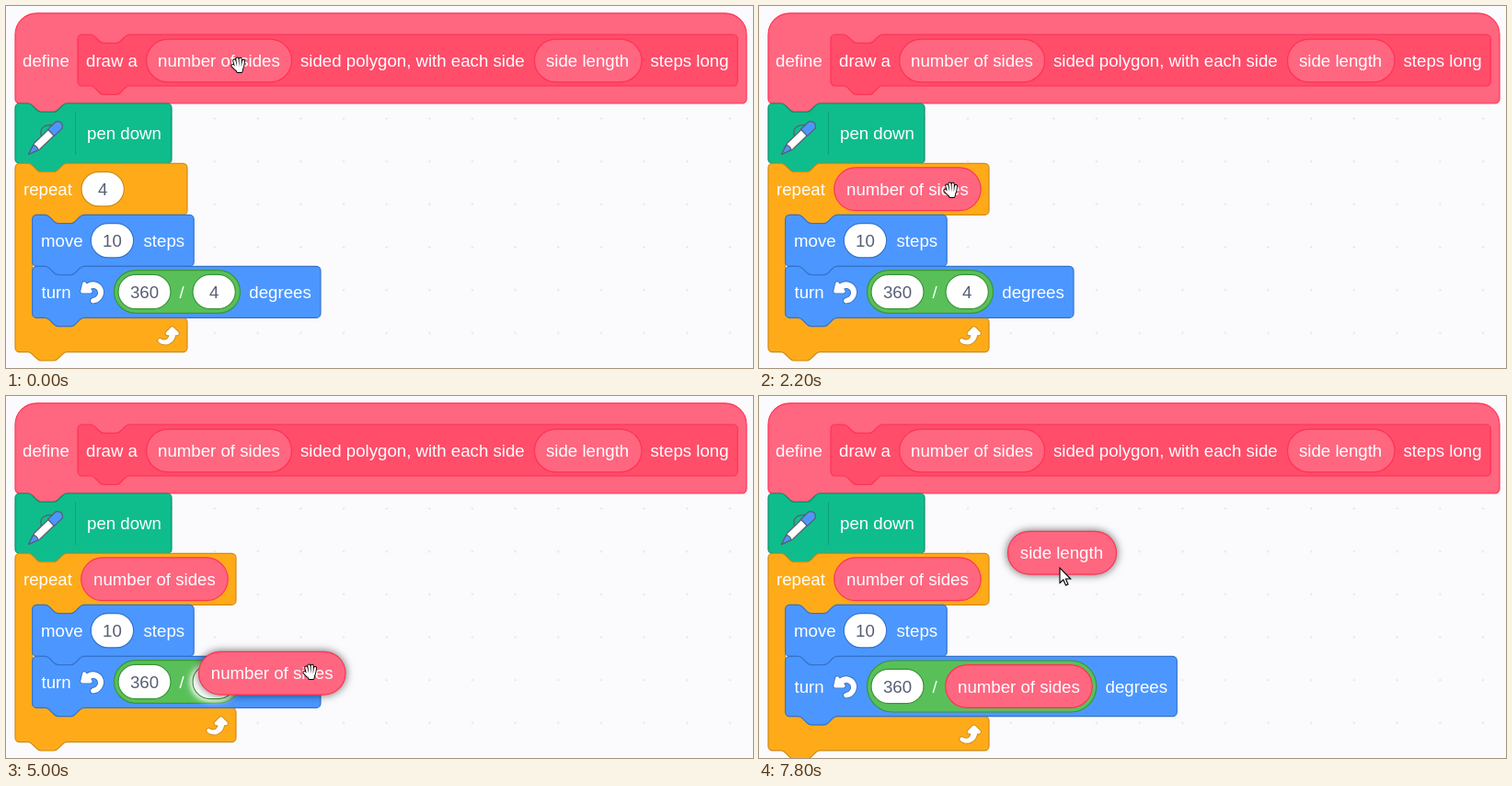
An HTML page that plays this animation: 812 by 394 pixels, repeating every 8000 ms.

```html
<!DOCTYPE html>
<html lang="en">
<head>
<meta charset="utf-8">
<title>Custom block with parameters</title>
<style>
html, body { margin: 0; width: 100%; height: 100%; overflow: hidden; background: #fbfafc; }
svg { display: block; width: 812px; height: 394px; }
text { font: 18.67px "Liberation Sans", Arial, sans-serif; fill: #fff; }
.value { fill: #575e75; text-anchor: middle; }
.drag { filter: drop-shadow(0 0 5px rgba(0, 0, 0, .6)); }
.glow { filter: drop-shadow(0 0 3px #fff) drop-shadow(0 0 3px #fff); }
</style>
</head>
<body>
<svg id="stage" viewBox="0 0 812 394"></svg>
<script>
const LOOP = 8000, STEP = 200, UNIT = 7 / 6;
const COLORS = {
  custom: ['#ff6680', '#ff3355'], proto: ['#ff4d6a', '#ff3355'], pen: ['#0fbd8c', '#0b8e69'],
  control: ['#ffab19', '#cf8b17'], motion: ['#4c97ff', '#3373cc'], operator: ['#59c059', '#389438']
};

// Block outlines, in block units
const NOTCH = 'c2 0 3 1 4 2l4 4c1 1 2 2 4 2h12c2 0 3-1 4-2l4-4c1-1 2-2 4-2';
const TAB = 'c-2 0-3 1-4 2l-4 4c-1 1-2 2-4 2h-12c-2 0-3-1-4-2l-4-4c-1-1-2-2-4-2';
const TOP = 'M0 4A4 4 0 0 1 4 0H12' + NOTCH;
const BOTTOM = `a4 4 0 0 1-4 4H48${TAB}H4a4 4 0 0 1-4-4z`;
const stack = (w, h) => `${TOP}H${w - 4}a4 4 0 0 1 4 4V${h - 4}${BOTTOM}`;
const hat = (w, h) => `M0 20A20 20 0 0 1 20 0H${w - 20}a20 20 0 0 1 20 20V${h - 4}${BOTTOM}`;
const mouth = (w, h) => `${TOP}H${w - 4}a4 4 0 0 1 4 4V44a4 4 0 0 1-4 4H64${TAB}h-8a4 4 0 0 0-4 4v${h - 8}` +
  `a4 4 0 0 0 4 4h8${NOTCH}H${w - 4}a4 4 0 0 1 4 4v24${BOTTOM}`;

const LOOP_ICON = 'M23.3 11c-.3.6-.9 1-1.5 1h-1.6c-.1 1.3-.5 2.5-1.1 3.6-.9 1.7-2.3 3.2-4.1 4.1-1.7.9-3.6 1.2-5.5.9-1.8-.3-3.5-1.1-4.9-2.3-.7-.7-.7-1.9 0-2.6.6-.6 1.6-.7 2.3-.2 1 .6 2 .9 3 .9s1.9-.3 2.7-.9c1.1-.8 1.8-2.1 1.8-3.5h-1.5c-.9 0-1.7-.7-1.7-1.7 0-.4.2-.9.5-1.2l4.4-4.4c.7-.6 1.7-.6 2.4 0L23 9.2c.5.5.6 1.2.3 1.8z';
const TURN_ICON = 'M22.7 12.2a1.6 1.6 0 0 1-1.3.6h-7.7a1.6 1.6 0 0 1-1.1-2.6l1.1-1.4a4.8 4.8 0 0 0-3.2-.7 4.3 4.3 0 0 0-3.3 2.5 5 5 0 0 0 .5 4.6 5.6 5.6 0 0 0 4.3 2.5 2.3 2.3 0 0 1-.2 4.5A10.2 10.2 0 0 1 3.7 18a10.1 10.1 0 0 1-1.5-9.2 9.8 9.8 0 0 1 7.5-6.3 10.7 10.7 0 0 1 7.7 1.7l1.1-1.4a1.6 1.6 0 0 1 2.7.6l1.7 7.4a1.6 1.6 0 0 1-.2 1.4z';

const paint = kind => `fill="${COLORS[kind][0]}" stroke="${COLORS[kind][1]}"`;
const block = (shape, kind, x, y, w, h) =>
  `<path transform="translate(${x} ${y}) scale(${UNIT})" d="${shape(w / UNIT, h / UNIT)}" ${paint(kind)}/>`;
// Labels and pills are placed by their vertical centre
const label = (s, x, cy) => `<text x="${x}" y="${cy + 6.5}">${s}</text>`;
const pill = (kind, x, cy, w, h = 46.7) =>
  `<rect x="${x}" y="${cy - h / 2}" width="${w}" height="${h}" rx="${h / 2}" ${paint(kind)} stroke-width="1.17"/>`;
const input = (kind, s, x, cy, w = 46.3) =>
  pill(kind, x, cy, w, 37.3).replace(COLORS[kind][0], '#fff') +
  `<text class="value" x="${x + w / 2}" y="${cy + 6.5}">${s}</text>`;
const param = (s, x, cy) => pill('custom', x, cy, s === 'side length' ? 118 : 159.5) + label(s, x + 13.3, cy);
const icon = (d, kind, x, y, flip = 1) =>
  `<path transform="translate(${x} ${y}) scale(${UNIT * flip} ${UNIT})" d="${d}" fill="#fff" stroke="${COLORS[kind][1]}" stroke-width="1.6" paint-order="stroke"/>`;

const penIcon = `<g transform="translate(24.5 161.5) rotate(-44)" stroke="#575e75" stroke-width="1.2" stroke-linejoin="round">
  <path d="M24-5C28-12 34-12 41-5" fill="none"/>
  <path d="M0 0L13-4.5H46Q52 0 46 4.5H13Z" fill="#fff"/>
  <path d="M34-5H46Q53 0 46 5H34Z" fill="#4c97ff"/>
  <path d="M0 0L11-3.8Q13 0 11 3.8Z" fill="#4c97ff"/></g>`;

const ARROW = '<path d="M0 0V16.5L3.8 13L6.5 19L9 18L6.4 12H11.7Z" fill="#fff" stroke="#000" stroke-width="1.1"/>';
const FINGERS = 'M-4.7-4.5L-3 2M-1.6-6.5L-.8 1M1.7-6.2L1.6 1M5-4L4 2M-6.5 1L-3 4.5M-2.5 2.5H3.5L2.5 7H-1Z';
const HAND = [['#000', 4], ['#fff', 2.2]].map(([color, w]) =>
  `<path d="${FINGERS}" fill="${color}" stroke="${color}" stroke-width="${w}" stroke-linecap="round" stroke-linejoin="round"/>`).join('');

// Motion keys: time, x, y
const CURSOR = [[0, 253, 64], [1200, 253, 64], [1600, 231, 153], [2200, 209, 200], [2800, 209, 202], [3400, 276, 59],
  [3800, 276, 59], [4200, 290, 115], [4800, 331, 297], [5000, 331, 300], [5600, 331, 304], [5800, 331, 304],
  [6800, 631, 63], [7200, 631, 63], [7800, 327, 187]];
const ARROW_TIMES = [[1400, 2000], [3000, 3200], [4000, 4600], [6000, 6600], [7400, 7800]];
const DRAGS = [
  { name: 'number of sides', end: 2000, keys: [[1200, 152, 59.5], [1600, 131.5, 140.7], [2000, 84, 196]] },
  { name: 'number of sides', end: 5000, keys: [[4000, 153, 59.5], [4200, 154.5, 66.7], [4800, 208, 296], [5000, 209.5, 301.7]] },
  { name: 'side length', end: 7800, keys: [[7200, 574, 59.5], [7800, 270.5, 170.7]] }
];

function at(keys, t) {
  const i = keys.findIndex(k => k[0] > t);
  if (i < 0) return keys[keys.length - 1].slice(1);
  if (i === 0) return keys[0].slice(1);
  const [a, b] = [keys[i - 1], keys[i]], p = (t - a[0]) / (b[0] - a[0]);
  return [1, 2].map(n => a[n] + (b[n] - a[n]) * p);
}

function header() {
  return block(hat, 'custom', 10, 7.8, 795, 98.2) + block(stack, 'proto', 78, 31, 717.3, 56) +
    label('define', 18, 59.5) + label('draw a', 87, 59.5) +
    pill('custom', 152.7, 59.5, 157.8) + label('number of sides', 165, 59.5) +
    label('sided polygon, with each side', 320, 59.5) +
    pill('custom', 574.5, 59.5, 116.5) + label('side length', 587, 59.5) + label('steps long', 700.5, 59.5);
}

function script(t) {
  const looped = t >= 2200, turned = t >= 5200;
  const turnH = turned ? 65.3 : 56, cy = turned ? 316 : 311;
  const right = looped ? 250 : 197, shift = turned ? 112.3 : 0;
  const glow = (on, s) => on ? `<g class="glow">${s}</g>` : s;
  return block(stack, 'pen', 10, 106, 170, 65.3) + penIcon +
    '<path d="M75.5 115V162" stroke="#0b8e69" stroke-opacity=".6"/>' + label('pen down', 88, 138.5) +
    block(mouth, 'control', 10, 171.3, right - 10, (56 + turnH) * 1) + label('repeat', 19, 199.3) +
    (looped ? param('number of sides', 81.7, 199.3) : glow(t === 2000, input('control', 4, 82, 199.3))) +
    icon(LOOP_ICON, 'control', right - 36.5, 283.3 + turnH + 5) +
    block(stack, 'motion', 28.7, 227.3, 175.5, 56) + label('move', 38, 255.3) +
    input('motion', 10, 92.3, 255.3) + label('steps', 149.5, 255.3) +
    block(stack, 'motion', 28.7, 283.3, 313.3 + shift, turnH) + label('turn', 38.5, cy) +
    icon(TURN_ICON, 'motion', 108, cy - 13.5, -1) +
    pill('operator', 117.5, cy, 137 + shift, turned ? 56 : 46.7) +
    input('operator', 360, 122, cy, 57) + label('/', 188.5, cy) +
    (turned ? param('number of sides', 202.7, cy) : glow(t === 4800 || t === 5000, input('operator', 4, 203, cy))) +
    label('degrees', 264.3 + shift, cy);
}

function scene(t) {
  const drag = DRAGS.find(d => t > d.keys[0][0] && t <= d.end);
  const arrow = ARROW_TIMES.some(([a, b]) => t >= a && t <= b);
  return `<defs><pattern id="dots" x="203.7" y="99.2" width="${40 * UNIT}" height="${40 * UNIT}" patternUnits="userSpaceOnUse">
    <circle cx="23.3" cy="23.3" r="1" fill="#ddd"/></pattern></defs>
    <rect width="812" height="394" fill="#fbfafc"/><rect width="812" height="394" fill="url(#dots)"/>` +
    header() + script(t) +
    (drag ? `<g class="drag">${param(drag.name, ...at(drag.keys, t))}</g>` : '') +
    `<g transform="translate(${at(CURSOR, t)})">${arrow ? ARROW : HAND}</g>`;
}

const stage = document.getElementById('stage');
let shown = -1;
function tick() {
  const t = Math.floor(performance.now() % LOOP / STEP) * STEP;
  if (t !== shown) stage.innerHTML = scene(shown = t);
  requestAnimationFrame(tick);
}
tick();
</script>
</body>
</html>
```
